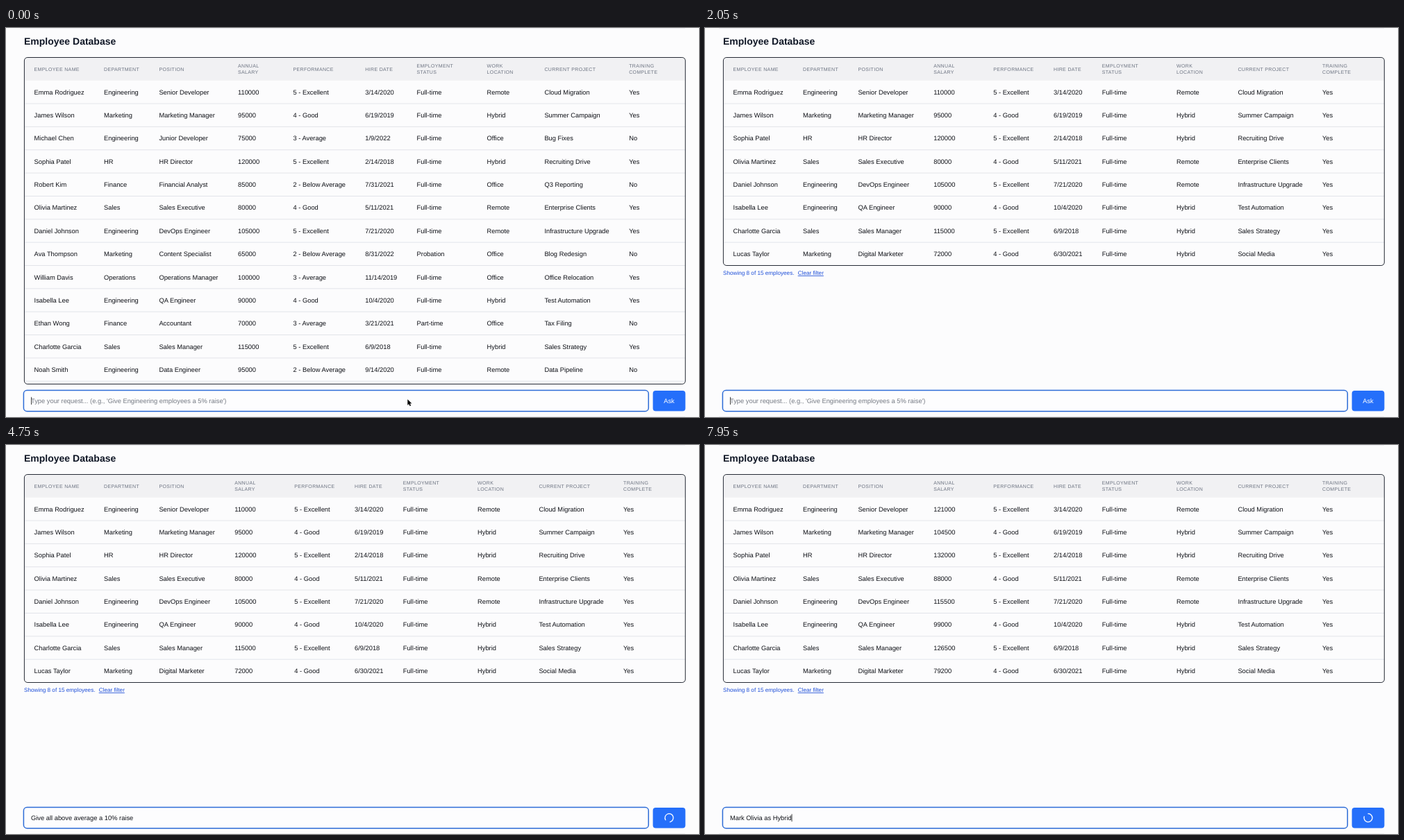
Write an HTML page that moves like this. It is 998 by 561 pixels and loops after 8 s.

```html
<!DOCTYPE html>
<html lang="en">
<head>
<meta charset="utf-8">
<title>Employee Database</title>
<style>
  html, body { margin: 0; width: 100%; height: 100%; overflow: hidden; background: #fcfcfd; }
  svg { display: block; width: 100%; height: 100%; }
  text {
    font: 9.33px "Liberation Sans", Arial, sans-serif;
    fill: #0f1117; white-space: pre; text-rendering: geometricPrecision;
  }
  .title { font-size: 14px; font-weight: bold; fill: #111827; }
  .head { font-size: 7px; letter-spacing: .35px; fill: #6b7280; }
  .old { fill: #9298a0; text-decoration: line-through; }
  .new { fill: #1d4ed8; }
  .note { font-size: 8.17px; fill: #1d4ed8; }
  .link { text-decoration: underline; }
  .label { fill: #fff; text-anchor: middle; }
</style>
</head>
<body>
<svg id="stage" viewBox="0 0 998 561"></svg>
<script>
const LOOP = 8000, ROW = 33.35, TOP = 42.5, BODY = 75.7, LEFT = 26.4, RIGHT = 978.3;
const HINT = "Type your request... (e.g., 'Give Engineering employees a 5% raise')";

const HEADS = ['EMPLOYEE NAME', 'DEPARTMENT', 'POSITION', 'ANNUAL/SALARY', 'PERFORMANCE', 'HIRE DATE',
  'EMPLOYMENT/STATUS', 'WORK/LOCATION', 'CURRENT PROJECT', 'TRAINING/COMPLETE'];
const RATINGS = { 2: '2 - Below Average', 3: '3 - Average', 4: '4 - Good', 5: '5 - Excellent' };
const PEOPLE = `Emma Rodriguez|Engineering|Senior Developer|110000|5|3/14/2020|Full-time|Remote|Cloud Migration|Yes
James Wilson|Marketing|Marketing Manager|95000|4|6/19/2019|Full-time|Hybrid|Summer Campaign|Yes
Michael Chen|Engineering|Junior Developer|75000|3|1/9/2022|Full-time|Office|Bug Fixes|No
Sophia Patel|HR|HR Director|120000|5|2/14/2018|Full-time|Hybrid|Recruiting Drive|Yes
Robert Kim|Finance|Financial Analyst|85000|2|7/31/2021|Full-time|Office|Q3 Reporting|No
Olivia Martinez|Sales|Sales Executive|80000|4|5/11/2021|Full-time|Remote|Enterprise Clients|Yes
Daniel Johnson|Engineering|DevOps Engineer|105000|5|7/21/2020|Full-time|Remote|Infrastructure Upgrade|Yes
Ava Thompson|Marketing|Content Specialist|65000|2|8/31/2022|Probation|Office|Blog Redesign|No
William Davis|Operations|Operations Manager|100000|3|11/14/2019|Full-time|Office|Office Relocation|Yes
Isabella Lee|Engineering|QA Engineer|90000|4|10/4/2020|Full-time|Hybrid|Test Automation|Yes
Ethan Wong|Finance|Accountant|70000|3|3/21/2021|Part-time|Office|Tax Filing|No
Charlotte Garcia|Sales|Sales Manager|115000|5|6/9/2018|Full-time|Hybrid|Sales Strategy|Yes
Noah Smith|Engineering|Data Engineer|95000|2|9/14/2020|Full-time|Remote|Data Pipeline|No
Lucas Taylor|Marketing|Digital Marketer|72000|4|6/30/2021|Full-time|Hybrid|Social Media|Yes`
  .split('\n').map(line => line.split('|'));
const ABOVE = PEOPLE.filter(person => person[4] >= 4);

const WIDE = [40.6, 141, 220.4, 334, 413.5, 517.3, 591.6, 692.6, 775.4, 897.2];
const NARROW = [40.6, 141, 220.4, 329.2, 415.3, 502, 571.7, 679, 767.4, 889];
const REVIEW = [40.6, 141, 220.4, 329.2, 424.4, 511, 580.8, 685.2, 771, 893];

// Commands: typing start, time per character, spinner start, spinner end, end of the step.
const COMMANDS = [
  { text: 'Find all above average', from: 60, pace: 46, busy: 1150, done: 2050, end: 2050, angle: 270, at: 1250 },
  { text: 'Give all above average a 10% raise', from: 2480, pace: 45, busy: 4100, done: 5150, end: 6050, angle: 95, at: 4600 },
  { text: 'Mark Olivia as Hybrid', from: 6320, pace: 55, busy: 7550, done: LOOP, end: LOOP, angle: 270, at: 7950 },
];

const stage = document.getElementById('stage');
function add(parent, tag, attrs = {}, content = '') {
  const node = document.createElementNS('http://www.w3.org/2000/svg', tag);
  for (const key in attrs) node.setAttribute(key, attrs[key]);
  node.textContent = content;
  return parent.appendChild(node);
}
const write = (parent, x, y, content, name = '') => add(parent, 'text', { x, y, class: name }, content);
const line = (parent, x1, x2, y, stroke) =>
  add(parent, 'line', { x1, x2, y1: y, y2: y, stroke, 'stroke-width': .8 });
const show = (node, on) => node.setAttribute('visibility', on ? 'visible' : 'hidden');
const raised = salary => Math.round(salary * 1.1);

function buildTable(people, columns, mode) {
  const view = add(stage, 'g');
  const full = mode === 'full';
  const bottom = full ? 513.5 : BODY + people.length * ROW;
  const box = { x: LEFT, y: TOP, width: RIGHT - LEFT, height: bottom - TOP, rx: 4.5 };
  const clip = add(view, 'clipPath', { id: 'clip-' + mode });
  add(clip, 'rect', box);
  const inner = add(view, 'g', { 'clip-path': `url(#clip-${mode})` });
  if (mode === 'review')
    add(inner, 'rect', { x: LEFT, y: BODY, width: RIGHT - LEFT, height: bottom - BODY, fill: '#faf3b6' });
  add(inner, 'rect', { x: LEFT, y: TOP, width: RIGHT - LEFT, height: BODY - TOP, fill: '#f1f1f3' });

  HEADS.forEach((head, i) => {
    const lines = mode === 'review' && i === 3 ? ['ANNUAL SALARY'] : head.split('/');
    lines.forEach((part, n) =>
      write(inner, columns[i], 61.5 + (n - (lines.length - 1) / 2) * 9.3, part, 'head'));
  });

  people.forEach((person, r) => {
    const y = BODY + ROW * r + 20;
    person.forEach((value, i) => {
      const x = columns[i];
      if (i === 4) value = RATINGS[value];
      if (i === 3 && mode === 'review') {
        write(inner, x, y, value, 'old');
        write(inner, x + value.length * 5.19 + 4.7, y, raised(value), 'new');
        return;
      }
      if (i === 3 && mode === 'raised') value = raised(value);
      write(inner, x, y, value);
    });
    if (full || r < people.length - 1) line(inner, LEFT, RIGHT, BODY + ROW * (r + 1), '#dcdfe5');
  });

  add(view, 'rect', { ...box, fill: 'none', stroke: '#252a35', 'stroke-width': 1 });
  if (!full) {
    write(view, 26, 356, 'Showing 8 of 15 employees.', 'note');
    write(view, 133.7, 356, 'Clear filter', 'note link');
  }
  return view;
}

line(stage, 20, 978, .4, '#e9e9ee');
line(stage, 20, 978, 560.5, '#ececf0');
write(stage, 26, 23.5, 'Employee Database', 'title');

const views = {
  full: buildTable(PEOPLE, WIDE, 'full'),
  filtered: buildTable(ABOVE, NARROW, 'filtered'),
  review: buildTable(ABOVE, REVIEW, 'review'),
  raised: buildTable(ABOVE, NARROW, 'raised'),
};

const field = add(stage, 'rect', {
  x: 25.4, y: 522.5, height: 30.2, rx: 4.8, fill: '#fdfdfe', stroke: '#2c6bd6', 'stroke-width': 1.5,
});
const entry = write(stage, 36, 541, '');
const caret = add(stage, 'rect', { y: 532.3, width: .8, height: 10.8, fill: '#111' });
const button = add(stage, 'rect', { y: 523, height: 29.4, rx: 4, fill: '#256ffa' });
const label = write(stage, 0, 541, '', 'label');
const spinner = add(stage, 'path', {
  d: 'M6 0a6 6 0 1 1-4.15-5.7', fill: 'none', stroke: '#fff', 'stroke-width': 1.3, 'stroke-linecap': 'round',
});
const pointer = add(stage, 'path', {
  d: 'M578.3 535.4v8.6l1.9-1.8 1.4 3.1 1.5-.7-1.4-3h2.7z',
  fill: '#000', stroke: '#fff', 'stroke-width': .7, 'paint-order': 'stroke',
});

function render(t) {
  const command = COMMANDS.find(c => t < c.end);
  const count = Math.max(0, Math.min(command.text.length, Math.floor((t - command.from) / command.pace)));
  const busy = t >= command.busy && t < command.done;
  const confirming = t >= command.done;
  const mode = t < 2050 ? 'full' : t < 5150 ? 'filtered' : t < 6050 ? 'review' : 'raised';
  for (const name in views) show(views[name], name === mode);

  entry.textContent = count ? command.text.slice(0, count) : HINT;
  entry.style.fill = count ? '' : '#757a83';
  caret.setAttribute('x', 36 + (count ? entry.getComputedTextLength() : 0));
  const typed = command.from + command.text.length * command.pace;
  show(caret, t < typed || (t - typed) % 1000 < 500);

  const left = confirming ? 922.2 : 931.6;
  field.setAttribute('width', left - 6.3 - 25.4);
  button.setAttribute('x', left);
  button.setAttribute('width', 978.4 - left);
  label.setAttribute('x', (left + 978.4) / 2);
  label.textContent = confirming ? 'Confirm' : 'Ask';
  show(label, !busy);
  show(spinner, busy);
  const angle = command.angle + (t - command.at) * .36;
  spinner.setAttribute('transform', `translate(955 537.7) rotate(${angle})`);
  show(pointer, t < COMMANDS[0].from + COMMANDS[0].pace);
}

const start = performance.now();
function tick() {
  render((performance.now() - start) % LOOP);
  requestAnimationFrame(tick);
}
tick();
</script>
</body>
</html>
```
